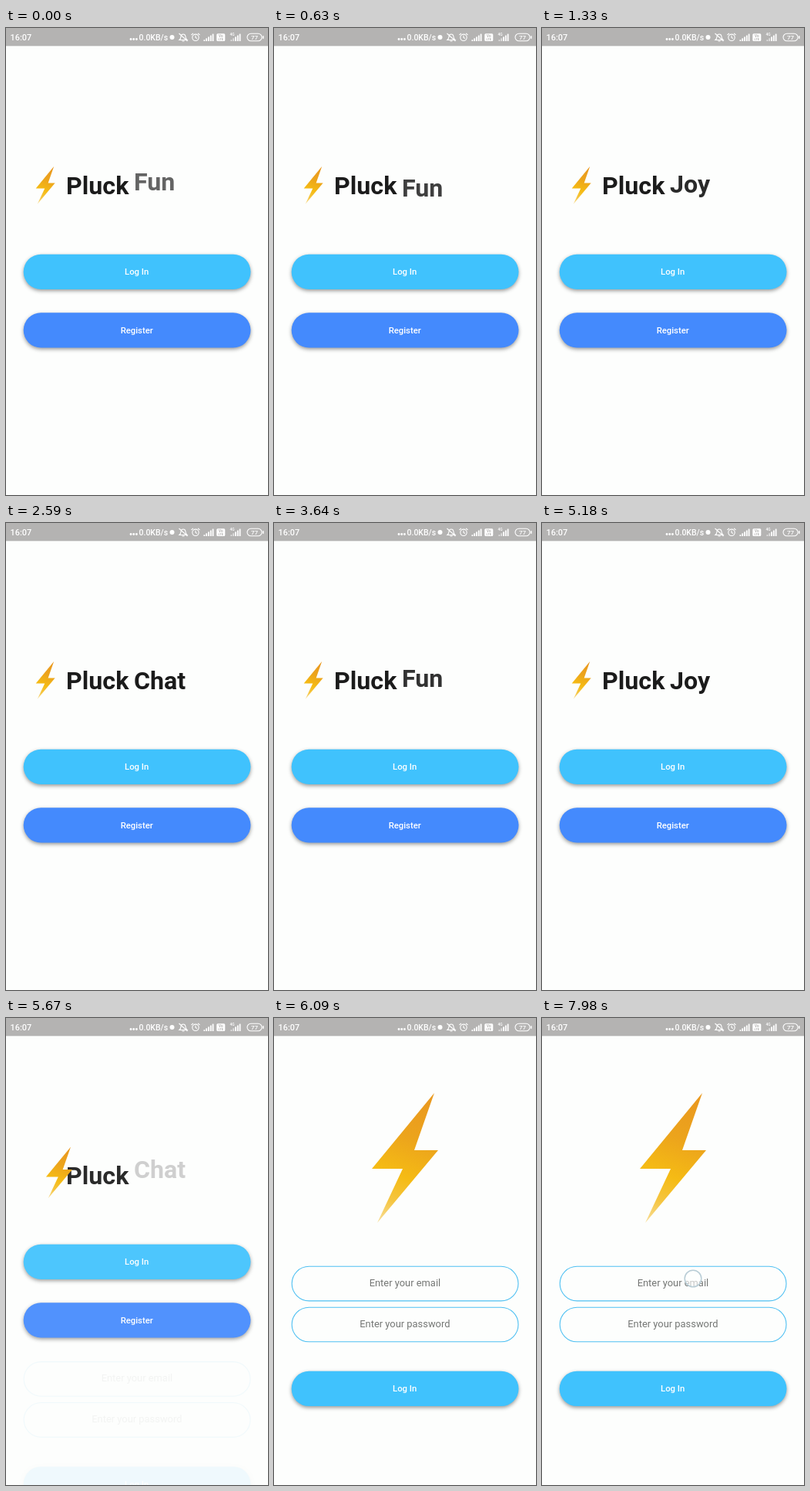
Recreate the animation shown at these times as an HTML page. Size 340x604 px, loop 8 s.

```html
<!DOCTYPE html>
<html lang="en">
<head>
<meta charset="utf-8">
<title>Chat app welcome</title>
<style>
  html, body { margin: 0; width: 100%; height: 100%; overflow: hidden; background: #fdfefd; }
  svg { display: block; width: 340px; height: 604px; font-family: Roboto, sans-serif; }
  .title { font-size: 32.2px; font-weight: 700; fill: #1b1b1b; }
  .btn rect { filter: drop-shadow(0 2.5px 2.5px rgba(0, 0, 0, .4)); }
  .btn text { font-size: 11.3px; font-weight: 500; fill: #fff; text-anchor: middle; }
  .field rect { fill: none; stroke: #4fc0f2; stroke-width: 1.1; }
  .field text { font-size: 12.9px; fill: #747674; text-anchor: middle; }
  .line { fill: none; stroke: #fff; stroke-width: 1.1; }
  .bar { fill: #fff; font-weight: 500; }
</style>
</head>
<body>
<svg viewBox="0 0 340 604">
  <defs>
    <linearGradient id="gold" gradientUnits="userSpaceOnUse" x1="70" y1="12" x2="8" y2="168">
      <stop offset="0" stop-color="#ea9a1f"/>
      <stop offset=".3" stop-color="#eca41c"/>
      <stop offset=".6" stop-color="#f5bb14"/>
      <stop offset=".8" stop-color="#f5c540"/>
      <stop offset="1" stop-color="#f8df9c"/>
    </linearGradient>
  </defs>

  <g id="welcome">
    <text class="title" x="78" y="215">Pluck</text>
    <text class="title" id="word" x="166"></text>
    <g class="btn">
      <rect x="22.7" y="292.7" width="294.8" height="45.3" rx="22.6" fill="#40c2fd"/>
      <text x="169.7" y="319.2">Log In</text>
    </g>
    <g class="btn">
      <rect x="22.7" y="368.2" width="294.8" height="45.3" rx="22.6" fill="#448afd"/>
      <text x="169.7" y="394.7">Register</text>
    </g>
  </g>

  <g id="login">
    <rect y="23" width="340" height="581" fill="#fdfefd"/>
    <g class="field">
      <rect x="23.2" y="321.3" width="293.8" height="44.6" rx="22.3"/>
      <text x="169.9" y="347">Enter your email</text>
    </g>
    <g class="field">
      <rect x="23.2" y="374.2" width="293.8" height="44.6" rx="22.3"/>
      <text x="169.9" y="400">Enter your password</text>
    </g>
    <g class="btn">
      <rect x="22.7" y="456.8" width="294.8" height="45.3" rx="22.6" fill="#40c2fd"/>
      <text x="169.7" y="483.3">Log In</text>
    </g>
  </g>

  <path id="bolt" fill="url(#gold)" d="M81 0L0 98H40L7 168L86 74H55Z"/>
  <circle id="touch" cx="196" cy="337" r="10.8" fill="#fff" fill-opacity=".6" stroke="#b9cdd6" stroke-width="1.5"/>

  <g class="bar">
    <rect width="340" height="23.3" fill="#b4b3b2"/>
    <text x="5.5" y="16" font-size="10.9">16:07</text>
    <text x="172.5" y="16" font-size="10.5">0.0KB/s</text>
    <circle cx="162" cy="14.5" r="1.4"/><circle cx="165.7" cy="14.5" r="1.4"/><circle cx="169.4" cy="14.5" r="1.4"/>
    <circle cx="215.5" cy="12" r="3"/>
    <path class="line" d="M225 15.5Q227 14 227 11Q227.500 8 230 8Q232.500 8 233 11Q233 14 235 15.500ZM228.500 17H231.500M224.500 7L235.500 17"/>
    <g class="line">
      <circle cx="246" cy="12.3" r="4.2"/>
      <path d="M246 9.800V12.500L248 13.500M240.500 9L243 6.800M251.500 9L249 6.800"/>
    </g>
    <g id="bars"></g>
    <rect x="273.300" y="7.300" width="11" height="9.700" rx="1.500"/>
    <text x="278.800" y="11.800" font-size="4.500" text-anchor="middle" fill="#a5a4a3">Vo</text>
    <text x="278.800" y="16" font-size="4" text-anchor="middle" fill="#a5a4a3">LTE</text>
    <text x="290.500" y="10" font-size="5">4G</text>
    <rect class="line" x="313" y="7.200" width="19" height="9.600" rx="4.800"/>
    <rect x="333" y="10" width="1.500" height="4" rx=".7"/>
    <text x="322.500" y="15" font-size="8" text-anchor="middle">77</text>
  </g>
</svg>
<script>
const $ = id => document.getElementById(id);
const LOOP = 8000;
const WORDS = ['Fun', 'Joy', 'Chat'];
const PERIOD = 1171, ENTER = 525, HOLD = 215, LEAD = 256, TRAVEL = 9.6;
const PUSH = 5600, PUSH_TIME = 340, TOUCH = 7840;

const clamp = x => Math.min(1, Math.max(0, x));
const mix = (a, b, x) => a + (b - a) * x;

function bezier(x1, y1, x2, y2) {
  const at = (a, b, u) => 3 * a * u * (1 - u) ** 2 + 3 * b * u * u * (1 - u) + u ** 3;
  return x => {
    let lo = 0, hi = 1;
    for (let i = 0; i < 20; i++) {
      const mid = (lo + hi) / 2;
      if (at(x1, x2, mid) < x) lo = mid; else hi = mid;
    }
    return at(y1, y2, (lo + hi) / 2);
  };
}
const easeIn = bezier(.42, 0, 1, 1);
const easeOut = bezier(0, 0, .58, 1);
const standard = bezier(.4, 0, .2, 1);

// Signal strength bars
for (const [left, full] of [[256.500, 5], [291.500, 5]]) {
  for (let i = 0; i < full; i++) {
    const h = 1.8 + i * 1.9, faint = left > 280 && i < 2 ? .6 : 1;
    $('bars').innerHTML +=
      `<rect x="${left + i * 2.8}" y="${17 - h}" width="1.8" height="${h}" opacity="${faint}"/>`;
  }
}

function drawWord(t) {
  const time = t + LEAD, phase = time % PERIOD;
  const enter = clamp(phase / ENTER);
  const leave = clamp((phase - ENTER - HOLD) / (PERIOD - ENTER - HOLD));
  const word = $('word');
  word.textContent = WORDS[Math.floor(time / PERIOD) % WORDS.length];
  word.setAttribute('y', 215 + TRAVEL * (enter - 1 + leave));
  word.setAttribute('opacity', easeOut(enter) * (1 - easeIn(leave)));
}

function drawPush(t) {
  const x = clamp((t - PUSH) / PUSH_TIME), move = standard(x);
  $('login').setAttribute('opacity', x === 0 ? 0 : x === 1 ? 1 : easeIn(x));
  $('login').setAttribute('transform', `translate(0 ${145 * (1 - move)})`);
  $('welcome').setAttribute('visibility', x < 1 ? 'visible' : 'hidden');
  $('bolt').setAttribute('transform',
    `translate(${mix(38.700, 127, move)} ${mix(179, 97, move)}) scale(${mix(.29, 1, move)})`);
}

function frame() {
  const t = performance.now() % LOOP;
  drawWord(t);
  drawPush(t);
  $('touch').setAttribute('visibility', t >= TOUCH ? 'visible' : 'hidden');
  requestAnimationFrame(frame);
}
frame();
</script>
</body>
</html>
```
